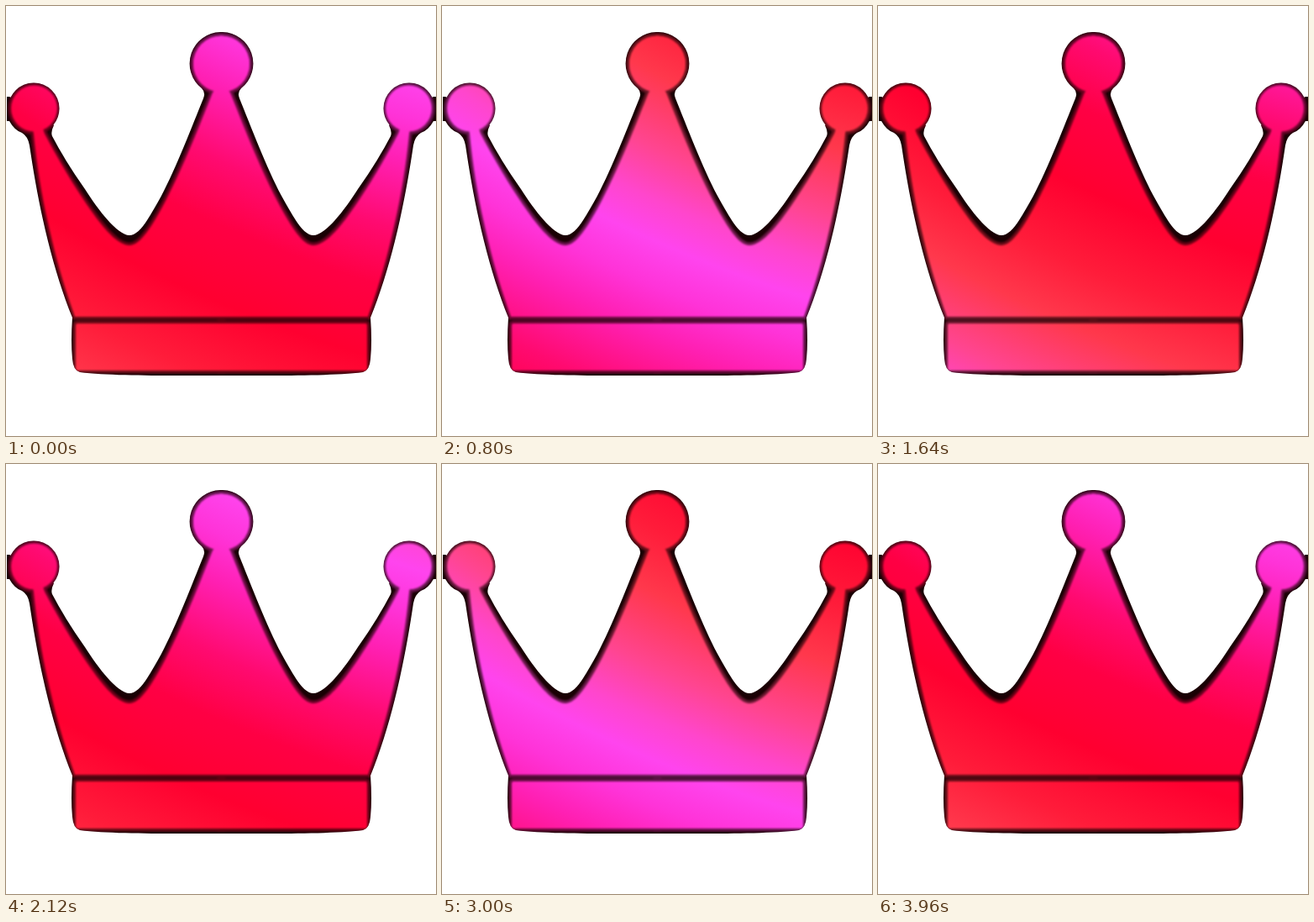
Write an HTML page that moves like this. It is 512 px wide and 512 px high and loops after 4000 ms.

```html
<!DOCTYPE html>
<html lang="en">
<head>
<meta charset="utf-8">
<title>Crown</title>
<style>
  html, body { margin: 0; width: 100%; height: 100%; overflow: hidden; background: #fff; }
  svg { display: block; width: 100%; height: 100%; }
</style>
</head>
<body>
<svg viewBox="0 0 512 512">
  <defs>
    <radialGradient id="shine" gradientUnits="userSpaceOnUse" spreadMethod="repeat"
      cx="906" cy="-1190" fx="906" fy="-1190">
      <stop offset="0" stop-color="#ff0030"/>
      <stop offset=".127" stop-color="#ff1c3a"/>
      <stop offset=".23" stop-color="#ff384c"/>
      <stop offset=".35" stop-color="#ff4590"/>
      <stop offset=".433" stop-color="#ff46cc"/>
      <stop offset=".5" stop-color="#ff44ee"/>
      <stop offset=".575" stop-color="#ff33d8"/>
      <stop offset=".65" stop-color="#ff20b4"/>
      <stop offset=".77" stop-color="#ff0a70"/>
      <stop offset=".873" stop-color="#ff0044"/>
      <stop offset="1" stop-color="#ff0030"/>
    </radialGradient>
    <filter id="soft" x="-5%" y="-5%" width="110%" height="110%" color-interpolation-filters="sRGB">
      <feGaussianBlur stdDeviation="1.1"/>
    </filter>

    <!-- left halves, mirrored for the right side -->
    <path id="outerHalf" d="M258 31H256.5A37.5 37.5 0 0 0 233 98Q238 103 235 110
      C222 142 203 192 185 226C170 253 159 273 147 273C132 273 108 240 94 218
      C77 194 64 172 55 155Q53 150 57 142L33 122L4 108H1V137H4
      Q10 148 19 151Q26 155 28 166C33 200 40 240 50 280C58 312 68 344 79 371
      Q77 400 79 420Q80 434 88 436C130 441 200 440 258 440Z
      M2.5 122a30.5 30.5 0 1 0 61 0a30.5 30.5 0 1 0 -61 0Z"/>
    <g id="innerHalf">
      <circle cx="256.5" cy="69" r="33.5"/>
      <circle cx="33.5" cy="122" r="27.5"/>
      <path d="M258 90H250V98L246 103C232 138 214 185 190 232C174 262 160 285 147 285
        C130 285 108 254 92 230C74 203 57 173 46 152L44 146H32L33 153
        C37 195 44 235 55 280C62 310 72 342 82 370H258Z"/>
      <path d="M258 378H85Q83 378 83 381V431Q83 434 86 434H258Z"/>
    </g>
    <g id="inner">
      <use href="#innerHalf"/>
      <use href="#innerHalf" transform="matrix(-1 0 0 1 513 0)"/>
    </g>
    <clipPath id="outline">
      <use href="#outerHalf"/>
      <use href="#outerHalf" transform="matrix(-1 0 0 1 513 0)"/>
    </clipPath>
    <mask id="face" maskUnits="userSpaceOnUse" x="0" y="0" width="512" height="512">
      <g filter="url(#soft)">
        <use href="#inner" fill="#555" stroke="#555" stroke-width="7"/>
        <use href="#inner" fill="#fff"/>
      </g>
    </mask>
  </defs>
  <g clip-path="url(#outline)">
    <rect width="512" height="512" fill="#1a0004"/>
    <rect width="512" height="512" fill="url(#shine)" mask="url(#face)"/>
  </g>
</svg>
<script>
  const LOOP = 4000, STEP = 40, SWEEP = 2000;
  const WAVE = 670, NEAR = 700, PHASE = 305;
  const shine = document.getElementById('shine');

  // Colour rings spread from far beyond the upper right, two sweeps per loop.
  function render(ms) {
    const t = Math.floor((ms % LOOP) / STEP) * STEP;
    const start = NEAR + (PHASE + WAVE * t / SWEEP) % WAVE;
    shine.setAttribute('fr', start);
    shine.setAttribute('r', start + WAVE);
  }

  const begin = performance.now();
  function tick() {
    render(performance.now() - begin);
    requestAnimationFrame(tick);
  }
  tick();
</script>
</body>
</html>
```
